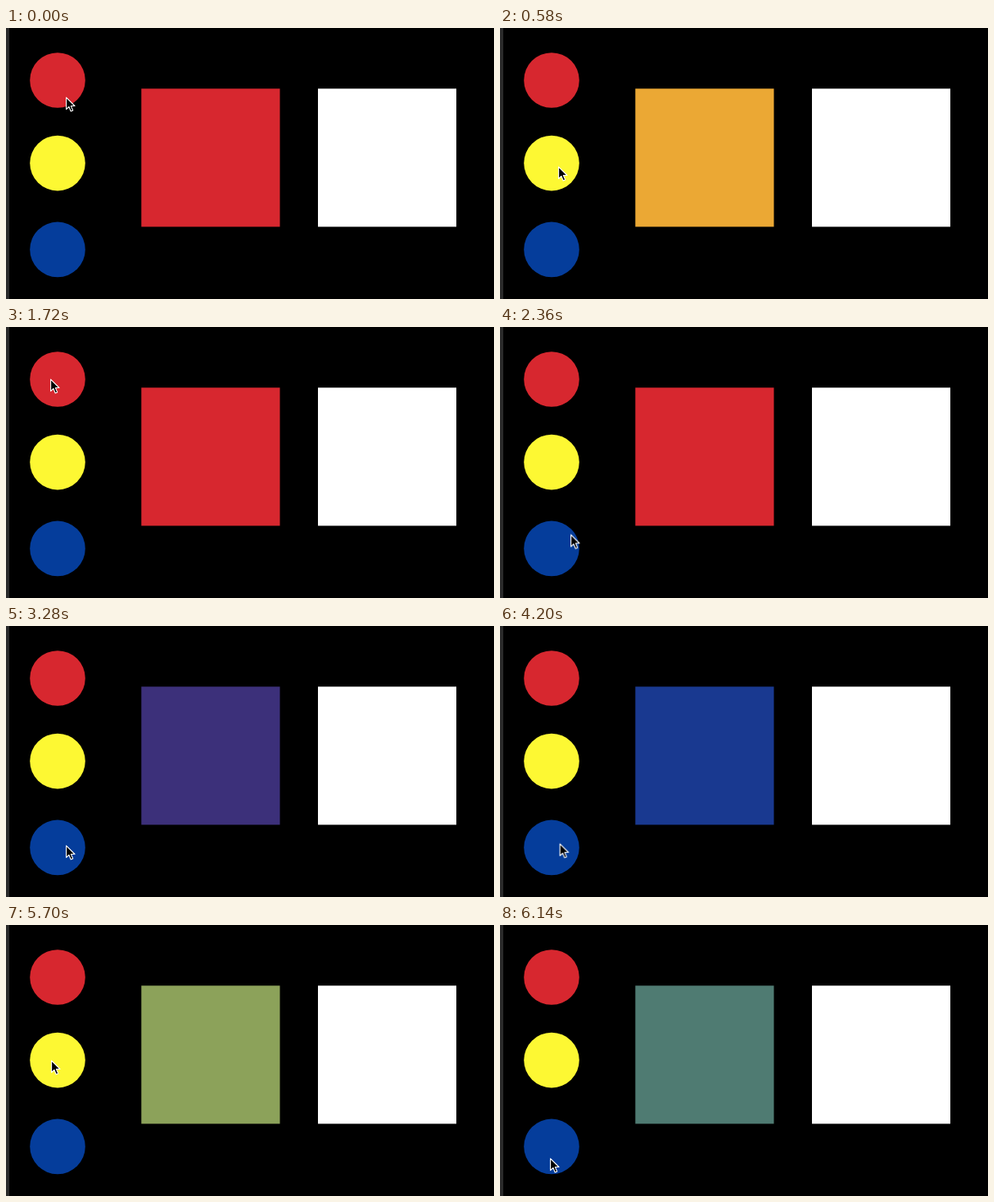
Animation of 596 by 332 pixels, one loop 6280 ms. Source, as an HTML page:

```html
<!DOCTYPE html>
<html lang="en">
<head>
<meta charset="utf-8">
<title>Colour mixing</title>
<style>
  html, body { margin: 0; width: 100%; height: 100%; overflow: hidden; background: #000; }
  svg { display: block; width: 596px; height: 332px; }
  :root { --red: #d7272f; --yellow: #fdf833; --blue: #053d9b; }

  .mix { fill: var(--red); animation: mix 6280ms step-end infinite; }
  .cursor { animation: move 6280ms ease-in-out infinite; }

  /* each click adds one part of the chosen paint */
  @keyframes mix {
    0% { fill: #d7272f; }
    9.23% { fill: #eba834; }
    11.78% { fill: #f1c334; }
    13.05% { fill: #f3cb34; }
    15.6% { fill: #f6d635; }
    19.1% { fill: #f8e035; }
    24.84% { fill: #d7272f; }
    45.22% { fill: #692d62; }
    50.63% { fill: #462f75; }
    52.22% { fill: #3c307a; }
    55.41% { fill: #2d3484; }
    58.59% { fill: #243789; }
    63.05% { fill: #1e388d; }
    66.56% { fill: #193990; }
    78.34% { fill: #6a8b62; }
    90.76% { fill: #8ca25a; }
    97.77%, 100% { fill: #4f7b72; }
  }

  @keyframes move {
    0%, 0.3% { transform: translate(73px, 84px); }
    5.1%, 19.1% { transform: translate(71px, 169px); animation-timing-function: ease-in; }
    21.34% { transform: translate(55px, 72px); animation-timing-function: ease-out; }
    22.61%, 35.03% { transform: translate(54px, 63px); animation-timing-function: ease-in; }
    37.58% { transform: translate(86px, 253px); animation-timing-function: ease-out; }
    38.54% { transform: translate(88px, 268px); }
    39.81% { transform: translate(80px, 274px); }
    41.72%, 66.56% { transform: translate(73px, 268px); }
    69.75%, 93.31% { transform: translate(55px, 165px); }
    97.77%, 100% { transform: translate(61px, 285px); }
  }
</style>
</head>
<body>
<svg viewBox="0 0 596 332" xmlns="http://www.w3.org/2000/svg">
  <rect width="596" height="332" fill="#000"/>
  <rect width="4" height="332" fill="#2a2a2a"/>
  <circle cx="63" cy="64" r="33.8" fill="var(--red)"/>
  <circle cx="63" cy="165.6" r="33.8" fill="var(--yellow)"/>
  <circle cx="63" cy="271.4" r="33.8" fill="var(--blue)"/>
  <rect class="mix" x="165.3" y="74.3" width="169.2" height="169.2"/>
  <rect x="381" y="74.3" width="169" height="169.2" fill="#fff"/>
  <g class="cursor">
    <path d="M.6 1.2V15.6L3.9 12.5L6.2 18L8.7 16.9L6.4 11.5H11Z"
          fill="#000" stroke="#fff" stroke-width="1.1" stroke-linejoin="round"/>
  </g>
</svg>
</body>
</html>
```
